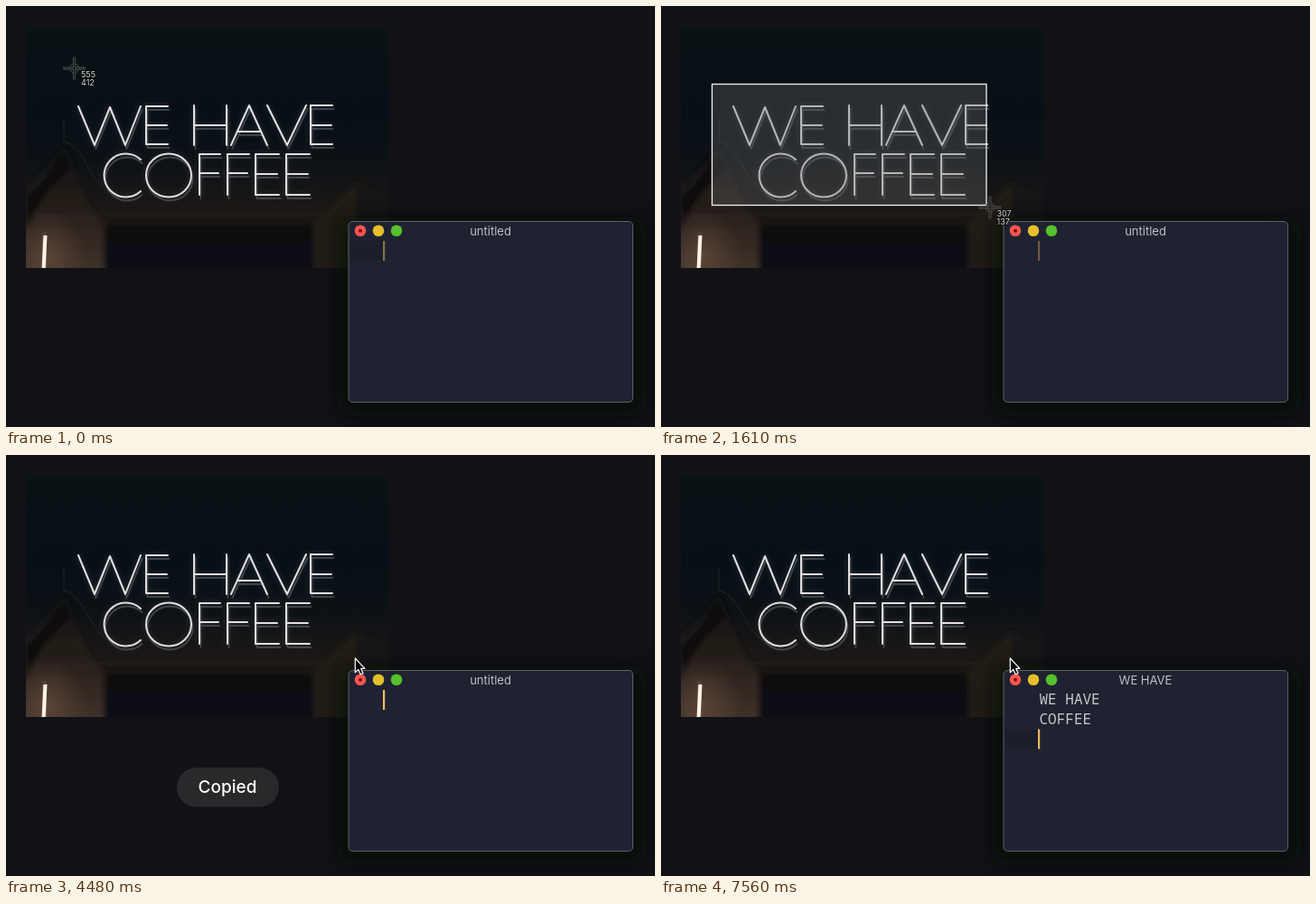
Animation of 718 by 466 pixels, one loop 7.63 s. Source, as an HTML page:

```html
<!DOCTYPE html>
<html lang="en">
<head>
<meta charset="utf-8">
<style>
  html, body { margin: 0; width: 100%; height: 100%; overflow: hidden; background: #121116; }
  svg { display: block; width: 718px; height: 466px; }
  text { font-family: Inter, "Open Sans", sans-serif; }
  .code text { font: 16px "Noto Sans Mono", monospace; fill: #c9cac8; }
  .neon { fill: none; stroke-linecap: round; stroke-linejoin: round; }
</style>
</head>
<body>
<svg viewBox="0 0 718 466">
  <defs>
    <linearGradient id="room" x2="0" y2="1">
      <stop offset="0" stop-color="#091214"/>
      <stop offset=".35" stop-color="#071017"/>
      <stop offset=".55" stop-color="#0c1115"/>
      <stop offset=".77" stop-color="#1c1816"/>
      <stop offset="1" stop-color="#161312"/>
    </linearGradient>
    <linearGradient id="wall" x2="0" y2="1">
      <stop offset="0" stop-color="#14120f"/>
      <stop offset=".45" stop-color="#241d19"/>
      <stop offset="1" stop-color="#43352c"/>
    </linearGradient>
    <linearGradient id="hall" x2="0" y2="1">
      <stop offset="0" stop-color="#14120f"/>
      <stop offset=".4" stop-color="#0a0f12"/>
      <stop offset="1" stop-color="#081016"/>
    </linearGradient>
    <radialGradient id="warm">
      <stop offset="0" stop-color="#8a6650" stop-opacity=".4"/>
      <stop offset="1" stop-color="#8a6650" stop-opacity="0"/>
    </radialGradient>
    <filter id="soft" x="-30%" y="-30%" width="160%" height="160%"><feGaussianBlur stdDeviation="3"/></filter>
    <filter id="shade" x="-30%" y="-30%" width="160%" height="170%"><feGaussianBlur stdDeviation="10"/></filter>
    <clipPath id="photo"><rect x="22" y="24" width="401" height="266"/></clipPath>
    <path id="sign" d="M80 111L98 154L115 112L132 154L149 111
      M179 111H155V153H179M155 132H178
      M208 110V154M244 110V154M208 132H244
      M249 154L269 110L289 154M256 139H282
      M289 110L311 154L332 110
      M361 110H337V153H361M337 132H360
      M149 170A24 24 0 1 0 149 205
      M205 187.500A25 24 0 1 0 155 187.500A25 24 0 1 0 205 187.500
      M237 164H214V209M214 185H235
      M269 164H245V209M245 185H267
      M302 164H276V209H302M276 186H300
      M336 164H310V209H336M310 186H334"/>
    <path id="cross" d="M-12.500 0H12.500M0-12.500V12.500"/>
  </defs>

  <rect width="718" height="466" fill="#121116"/>

  <g clip-path="url(#photo)">
    <rect x="22" y="24" width="401" height="266" fill="url(#room)"/>
    <g filter="url(#soft)">
      <path d="M15 205Q40 190 64 156L92 222L108 240V300H15Z" fill="url(#wall)"/>
      <path d="M22 250Q36 210 72 180L62 165Q38 200 22 210Z" fill="#0f0f0f"/>
      <path d="M338 242L388 195V300H338Z" fill="#231d19"/>
      <path d="M388 195L430 215V300H388Z" fill="#151517"/>
      <path d="M108 240H340V300H108Z" fill="url(#hall)"/>
    </g>
    <path d="M80 231H392" stroke="#25201c" fill="none"/>
    <path d="M64 125V150Q78 152 92 180T130 212" stroke="#262421" fill="none"/>
    <ellipse cx="46" cy="275" rx="42" ry="50" fill="url(#warm)"/>
    <path d="M44 254L41 292" stroke="#e9b38e" stroke-width="4" opacity=".7" filter="url(#soft)"/>
    <path d="M43.500 254L41.500 292" stroke="#fff3e8" stroke-width="4"/>
    <g class="neon">
      <use href="#sign" x="1.500" y="4" stroke="#565a5f" stroke-width="1.800" opacity=".65"/>
      <use href="#sign" stroke="#8d8998" stroke-width="3" opacity=".25" filter="url(#soft)"/>
      <use href="#sign" stroke="#e2dedf" stroke-width="2"/>
    </g>
  </g>

  <rect x="366" y="234" width="342" height="220" rx="14" fill="#010706" opacity=".6" filter="url(#shade)"/>
  <rect x="379" y="238.500" width="314.500" height="200" rx="4.500" fill="#1f2231" stroke="#5d6065"/>
  <circle cx="392" cy="248.800" r="6.300" fill="#fb5650"/>
  <circle cx="392" cy="248.800" r="2" fill="#7c0d0b"/>
  <circle cx="412" cy="248.800" r="6.300" fill="#e5bf2a"/>
  <circle cx="432" cy="248.800" r="6.300" fill="#53c22b"/>
  <text id="title" x="536" y="254" font-size="13" text-anchor="middle" fill="#bfc1c4"></text>
  <rect id="gutter" x="380" width="37" height="21.500" fill="#1b1e2b"/>
  <g class="code" id="code">
    <text x="418.500" y="276">WE HAVE</text>
    <text x="418.500" y="298">COFFEE</text>
  </g>
  <rect id="caret" x="417" width="2.200" height="22" fill="#edbd61"/>

  <rect id="area" x="56.500" y="86.500" fill="#646464" fill-opacity=".35" stroke="#f0f0f0" stroke-width="1.300"/>
  <g id="aim">
    <use href="#cross" stroke="#545857" stroke-width="2.800"/>
    <circle r="5" fill="none" stroke="#4a4e4d"/>
    <use href="#cross" stroke="#111515" stroke-width="1.200"/>
    <g font-size="9" fill="#e2e2e2" stroke="#000" stroke-width="1.500" paint-order="stroke">
      <text id="aimX" x="7.500" y="10"></text>
      <text id="aimY" x="7.500" y="19"></text>
    </g>
  </g>

  <g id="toast">
    <rect x="189" y="346" width="113" height="43.500" rx="21.700" fill="#29292b"/>
    <text x="245" y="374" font-size="19" font-weight="500" text-anchor="middle" fill="#fff">Copied</text>
  </g>
  <g id="key">
    <rect id="cap" y="368" height="56" rx="13" fill="#1b1c1d"/>
    <path id="cmd" fill="none" stroke="#fff" stroke-width="2"
      d="M-3.600-3.600H-6.500a2.900 2.900 0 1 1 2.900-2.900V6.500a2.900 2.900 0 1 1-2.900-2.900H6.500a2.900 2.900 0 1 1-2.900 2.900V-6.500a2.900 2.900 0 1 1 2.900 2.900Z"/>
    <text id="vee" x="372" y="405" font-size="24" text-anchor="middle" fill="#fff">V</text>
  </g>
  <path id="pointer" d="M386.300 225V240.700L389.800 237.400L392.200 242.800L395 241.600L392.700 236.300H397Z"
    fill="#000" stroke="#fff" stroke-width="1.200" stroke-linejoin="round"/>
</svg>

<script>
const LOOP = 7630, START = [57, 86], PRESS = 800, PASTE = 6475, BLINK = 1050;
const $ = id => document.getElementById(id);
const set = (id, attrs) => { for (const k in attrs) $(id).setAttribute(k, attrs[k]); };
const show = (id, on) => set(id, { opacity: +on });
const clamp = v => Math.max(0, Math.min(1, v));
const ramp = (t, from, to) => clamp((t - from) / (to - from));
const smooth = p => p * p * (3 - 2 * p);
const easeOut = p => 1 - (1 - p) ** 2;

// time, x, y, easing towards this stop
const path = [
  [0, 75.5, 69],
  [630, ...START, smooth],
  [PRESS, ...START, smooth],
  [1120, 289, 213, smooth],
  [1610, 364, 223, easeOut],
  [2310, 390, 228.5, smooth],
];

function aimAt(t) {
  let i = 1;
  while (i < path.length - 1 && t > path[i][0]) i++;
  const [t0, x0, y0] = path[i - 1], [t1, x1, y1, ease] = path[i];
  const p = ease(ramp(t, t0, t1));
  return [x0 + (x1 - x0) * p, y0 + (y1 - y0) * p];
}

function draw(t) {
  const [x, y] = aimAt(t), drag = t > PRESS, pasted = t >= PASTE;

  set("aim", { transform: `translate(${x} ${y})` });
  show("aim", t < 2590);
  $("aimX").textContent = Math.round(drag ? x - START[0] : x + 479.5);
  $("aimY").textContent = Math.round(drag ? y - START[1] : y + 343);

  set("area", {
    width: Math.max(0, Math.round(x - 4) - 56.5),
    height: Math.max(0, Math.round(y - 2) - 87),
  });
  show("area", drag && t < 3010);
  show("pointer", t >= 3010);

  const peak = pasted ? PASTE : 260;
  set("caret", {
    y: pasted ? 303.5 : 260,
    opacity: 0.5 + 0.5 * Math.cos((t - peak) / BLINK * 2 * Math.PI),
  });
  set("gutter", { y: pasted ? 304 : 260 });
  show("gutter", t < 770 || t >= 5320);
  show("code", pasted);
  $("title").textContent = pasted ? "WE HAVE" : "untitled";

  show("toast", ramp(t, 3750, 4200) - ramp(t, 5180, 5460));

  const chord = t >= 6370, half = chord ? 44 : 32.5;
  set("cap", { x: 359.5 - half, width: half * 2 });
  set("cmd", { transform: `translate(${chord ? 347 : 359.5} 397)` });
  show("vee", chord);
  show("key", ramp(t, 5530, 5670) - ramp(t, 7100, 7380));
}

const begin = performance.now();
function tick() {
  draw((performance.now() - begin) % LOOP);
  requestAnimationFrame(tick);
}
draw(0);
requestAnimationFrame(tick);
</script>
</body>
</html>
```
